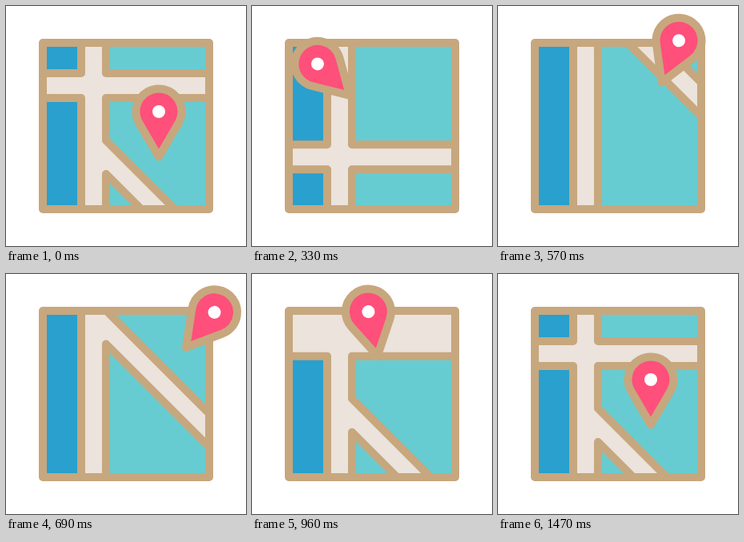
Write an HTML page with a canvas that moves like this. It is 300 px wide and 300 px high and loops after 1.5 s.

```html
<!DOCTYPE html>
<html>
<head>
<meta charset="utf-8">
<style>
  html, body { margin: 0; width: 100%; height: 100%; overflow: hidden; background: #fff; }
  canvas { display: block; }
</style>
</head>
<body>
<canvas id="stage" width="300" height="300"></canvas>
<script>
const ctx = document.getElementById('stage').getContext('2d');
const LOOP = 1500, STEP = 30, SCROLL_END = 1080, TILE = 446;
const TAN = '#c7a77e', BLUE = '#2aa0ce', TEAL = '#67ccd1', ROAD = '#ebe3dc', PINK = '#ff4f7b';

// City blocks of one map tile; the gaps between them are roads.
const BLOCKS = [
  [BLUE, [46, 115], [94, 115], [94, 84 + TILE], [46, 84 + TILE]],
  [TEAL, [125, 115], [254, 115], [254, 297], [125, 168]],
  [TEAL, [125, 210], [254, 339], [254, 84 + TILE], [125, 84 + TILE]]
];

const sine = p => (1 - Math.cos(Math.PI * p)) / 2;
const quad = p => p < .5 ? 2 * p * p : 1 - 2 * (1 - p) ** 2;

// Swings between [time, value] extremes.
function swing(keys, t) {
  for (let i = 1; i < keys.length; i++) {
    const [t0, a] = keys[i - 1], [t1, b] = keys[i];
    if (t < t1) return a + (b - a) * sine((t - t0) / (t1 - t0));
  }
  return keys[keys.length - 1][1];
}

const SWAY = [[0, 191], [270, 117], [690, 225], [1000, 154], [1200, 191]];
const TILT = [[0, 0], [270, -50], [690, 39], [1060, -22], [1240, 0]];

function tipY(t) {
  const rise = 86 + 102.5 * Math.exp(-t / 240);
  const fall = 88.5 + 100 * (Math.min(1, (t - 820) / 375)) ** 2;
  return t < 830 ? rise : fall;
}

function drawMap(t) {
  const p = Math.min(1, t / SCROLL_END);
  const shift = TILE * (sine(p) + quad(p)) / 2 % TILE;
  ctx.lineWidth = 10;
  ctx.strokeStyle = TAN;
  ctx.save();
  ctx.beginPath();
  ctx.rect(46, 46, 208, 208);
  ctx.clip();
  ctx.fillStyle = ROAD;
  ctx.fillRect(46, 46, 208, 208);
  for (const dy of [shift, shift - TILE]) {
    for (const [color, ...points] of BLOCKS) {
      ctx.beginPath();
      points.forEach(([x, y]) => ctx.lineTo(x, y + dy));
      ctx.closePath();
      ctx.fillStyle = color;
      ctx.fill();
      ctx.stroke();
    }
  }
  ctx.restore();
  ctx.strokeRect(46, 46, 208, 208);
}

function drawRipple(t) {
  const p = (t - 1110) / 390;
  if (p <= 0) return;
  const grow = 1 - (1 - p) ** 2, width = 7 * (1 - p) + .5;
  ctx.save();
  ctx.globalAlpha = 1 - p;
  ctx.strokeStyle = '#989eb7';
  ctx.lineWidth = width;
  ctx.beginPath();
  ctx.ellipse(190.5, 189, Math.max(.1, 2 + 35 * grow - width / 2),
    Math.max(.1, 2.5 + 20 * grow - width / 2), 0, 0, 7);
  ctx.stroke();
  ctx.restore();
}

function drawPin(t) {
  const r = 28.5, height = 56.5, tangent = Math.asin(r / height);
  ctx.save();
  ctx.translate(swing(SWAY, t), tipY(t));
  ctx.rotate(swing(TILT, t) * Math.PI / 180);
  ctx.beginPath();
  ctx.moveTo(0, 0);
  ctx.arc(0, -height, r, Math.PI - tangent, 2 * Math.PI + tangent);
  ctx.closePath();
  ctx.fillStyle = PINK;
  ctx.fill();
  ctx.stroke();
  ctx.beginPath();
  ctx.arc(0, -height, 8, 0, 7);
  ctx.fillStyle = '#fff';
  ctx.fill();
  ctx.restore();
}

function draw() {
  const t = Math.floor(performance.now() % LOOP / STEP) * STEP;
  ctx.fillStyle = '#fff';
  ctx.fillRect(0, 0, 300, 300);
  ctx.lineJoin = 'round';
  drawMap(t);
  drawRipple(t);
  drawPin(t);
  requestAnimationFrame(draw);
}
draw();
</script>
</body>
</html>
```
